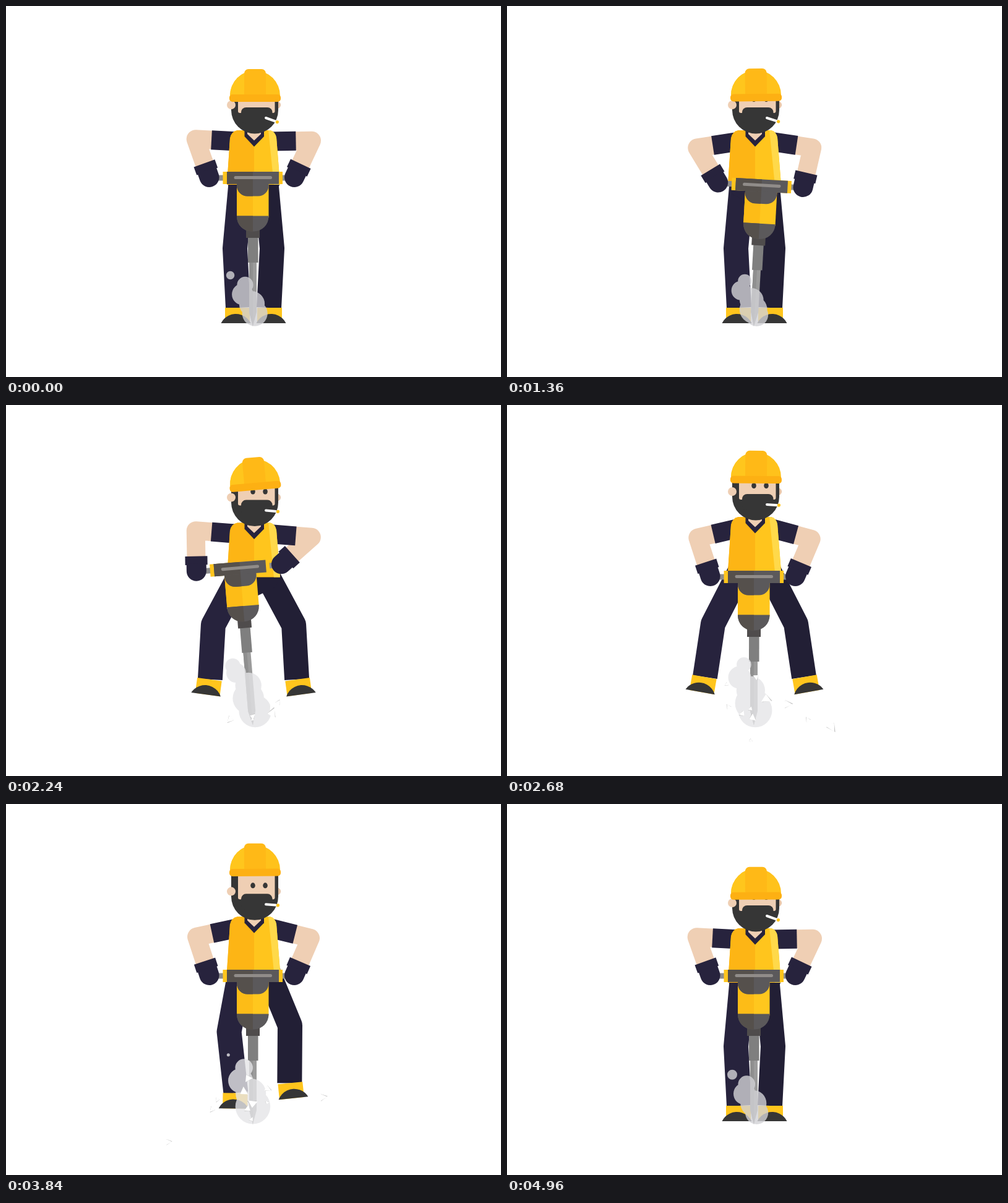
Write an HTML page with a canvas that moves like this. It is 800 px wide and 600 px high and loops after 5 s.

```html
<!DOCTYPE html>
<html lang="en">
<head>
<meta charset="utf-8">
<title>Jackhammer</title>
<style>
  html, body { margin: 0; width: 100%; height: 100%; overflow: hidden; background: #fff; }
  canvas { display: block; }
</style>
</head>
<body>
<canvas width="800" height="600"></canvas>
<script>
const ctx = document.querySelector('canvas').getContext('2d');
const LOOP = 5000, LIFTOFF = 1760, LANDING = 3930;
const NAVY = '#27233d', NAVY_DARK = '#221f35', SKIN = '#efcfb4', HAIR = '#363636';
const YELLOW = '#ffc51d', ORANGE = '#fdb515';
const TIP = { x: 399, y: 517 };

const rad = deg => deg * Math.PI / 180;
const mix = (a, b, u) => a + (b - a) * u;
const clamp = u => Math.min(1, Math.max(0, u));
const random = n => { const s = Math.sin(n * 127.1) * 43758.5; return s - Math.floor(s); };

function ease(t, from, to) {
  const u = clamp((t - from) / (to - from));
  return u * u * (3 - 2 * u);
}

// half a sine wave between two times, zero elsewhere
const pulse = (t, from, to) => Math.sin(Math.PI * clamp((t - from) / (to - from)));

// steady climb to the peak, then a free fall
function hop(t, peak) {
  if (t < peak) return clamp((t - LIFTOFF) / (peak - LIFTOFF));
  return 1 - clamp((t - peak) / (LANDING - peak)) ** 2;
}

function poseAt(t) {
  const cycle = 2 * Math.PI * t / LOOP;
  const rise = hop(t, 3600), jolt = pulse(t, 1800, 2680), bob = Math.sin(2 * cycle);
  return {
    rise,
    body: -40 * rise,
    lift: 3 * bob - 21 * hop(t, 3800),
    tilt: rad(2 * bob * (1 - rise) - 4 * jolt),
    sway: rad(3.4 * pulse(t, 0, 2200) - 4.7 * jolt
      + 4 * pulse(t, 2680, 3480) + 2 * pulse(t, 3960, 4960)),
    slide: 12 * pulse(t, 900, 1820) - 15 * jolt,
    cigarette: rad(3.5 + 16.5 * Math.cos(4 * cycle) * (1 - 2 * rise))
  };
}

function at(x, y, angle, draw) {
  ctx.save();
  ctx.translate(x, y);
  ctx.rotate(angle);
  draw();
  ctx.restore();
}

function rect(color, x, y, w, h, r = 0) {
  ctx.fillStyle = color;
  ctx.beginPath();
  ctx.roundRect(x, y, w, h, r);
  ctx.fill();
}

function oval(color, x, y, rx, ry = rx) {
  ctx.fillStyle = color;
  ctx.beginPath();
  ctx.ellipse(x, y, rx, ry, 0, 0, 7);
  ctx.fill();
}

function poly(color, ...pts) {
  ctx.fillStyle = color;
  ctx.beginPath();
  for (let i = 0; i < pts.length; i += 2) ctx.lineTo(pts[i], pts[i + 1]);
  ctx.fill();
}

function line(color, width, cap, ...pts) {
  ctx.strokeStyle = color;
  ctx.lineWidth = width;
  ctx.lineCap = cap;
  ctx.lineJoin = 'round';
  ctx.beginPath();
  for (let i = 0; i < pts.length; i += 2) ctx.lineTo(pts[i], pts[i + 1]);
  ctx.stroke();
}

function twoTone(shape, split, left, right) {
  ctx.save();
  ctx.clip(shape);
  rect(right, split - 200, -400, 400, 1200);
  rect(left, split - 200, -400, 200, 1200);
  ctx.restore();
}

function box(x, y, w, h, r = 0) {
  const p = new Path2D();
  p.roundRect(x, y, w, h, r);
  return p;
}

const VEST = new Path2D(
  'M357 289L362 214Q364 203 374 201H427Q435 203 437 213L443 289Z');
const PELVIS = new Path2D('M357.5 285H443.5L436 305L400 322L365 305Z');
const DOME = new Path2D('M-40.5 1A40.5 40.5 0 0 1 40.5 1Z');

function drawLeg(side, t, { rise, body }) {
  const fold = 3520 + (side > 0 ? 160 : 0);
  const spread = ease(t, LIFTOFF, 2360) * (1 - ease(t, fold, fold + 380));
  const kneeSpread = Math.sqrt(spread);
  const kx = 400 + side * mix(30, 67, kneeSpread), ky = mix(392 + body, 354, kneeSpread);
  const fx = 400 + side * mix(25, 70 + 20 * rise, spread), fy = mix(488 + body, 440, spread);

  line(side < 0 ? NAVY : NAVY_DARK, 40, 'butt', 400 + side * 20, 282 + body, kx, ky, fx, fy);
  at(fx, fy, rad(-side * spread * (7 + 6 * rise)), () => {
    ctx.scale(side, 1);
    rect(YELLOW, -19, 0, 40, 25);
    ctx.fillStyle = HAIR;
    ctx.beginPath();
    ctx.arc(3.5, 36.7, 26.7, Math.PI + 0.453, -0.453);
    ctx.fill();
  });
}

// two-bone arm from the shoulder to the hammer grip
function makeArm(side, { body, sway, slide }) {
  const upper = 68.5, lower = 65.5;
  const sx = side < 0 ? 375 : 425.5, sy = 219 + body;
  const lx = side < 0 ? -70.5 : 67, ly = slide - 240;
  const hx = TIP.x + lx * Math.cos(sway) - ly * Math.sin(sway);
  const hy = TIP.y + lx * Math.sin(sway) + ly * Math.cos(sway);
  const d = Math.hypot(hx - sx, hy - sy);
  const bend = Math.acos((upper * upper + d * d - lower * lower) / (2 * upper * d));
  const a = Math.atan2(hy - sy, hx - sx) - side * bend;
  const ex = sx + upper * Math.cos(a), ey = sy + upper * Math.sin(a);
  return { sx, sy, ex, ey, hx, hy, a };
}

function drawArm({ sx, sy, ex, ey, hx, hy, a }) {
  line(SKIN, 30, 'butt', sx, sy, ex, ey, hx, hy);
  line(NAVY, 31, 'butt', sx, sy, sx + 43 * Math.cos(a), sy + 43 * Math.sin(a));
}

function drawGlove({ ex, ey, hx, hy }) {
  at(hx, hy, Math.atan2(hy - ey, hx - ex) - Math.PI / 2, () => {
    rect(NAVY, -18, -24, 36, 14);
    rect(NAVY, -16, -12, 32, 28, [0, 0, 16, 16]);
  });
}

function drawTorso() {
  twoTone(VEST, 401, ORANGE, YELLOW);
  ctx.save();
  ctx.clip(VEST);
  poly('#ffd94a', 424, 200, 440, 200, 446, 290, 433, 290);
  ctx.restore();
  poly(NAVY, 385.5, 200, 417, 200, 417, 211, 401, 227.5, 385.5, 211);
  poly(SKIN, 390, 200, 412, 200, 412, 207, 401, 217.5, 390, 207);
}

function drawHead(cigarette) {
  oval('#e6c3a6', 438, 160, 6);
  rect(HAIR, 364, 132, 76, 74.5, [0, 0, 38, 38]);
  rect(SKIN, 375, 132, 59.5, 41, [0, 0, 3, 3]);
  rect(HAIR, 380, 164, 50.5, 26, 8);
  oval(SKIN, 364, 160, 7);
  oval(HAIR, 399, 150.5, 3.8, 4.5);
  oval(HAIR, 419, 150.5, 3.8, 4.5);
  at(420, 181, cigarette, () => {
    line('#fff', 4, 'round', 0, 0, 16, 0);
    oval(YELLOW, 19.5, 0, 2.6);
  });
}

function drawHelmet() {
  twoTone(DOME, 0, '#ffc61d', '#ffc21b');
  rect('#ffb917', -17.5, -42, 35, 43, [7, 7, 0, 0]);
  rect('#fdb013', -41.5, -1, 83, 12, 5);
}

function drawHammer(slide) {
  const tip = 239 - slide;
  const dark = shape => twoTone(shape, 0, '#55504c', '#5b595b');
  poly('#9b9b9b', -6, 130, 6, 130, 6, tip - 22, 0, tip + 1, -6, tip - 22);
  poly('#8f8f8f', -6, 130, 0, 130, 0, tip + 1, -6, tip - 22);
  rect('#7f7f7f', -8, 95, 16.5, 42);
  rect('#4f4c4c', -11, 82, 22, 15);
  rect('#8d8d8d', -57, -4.5, 110, 9);
  rect(YELLOW, -48.5, -10, 96.5, 20);
  twoTone(box(-26, 8, 51.5, 56), 0, '#fdbc17', '#ffc71e');
  dark(box(-26, 61.5, 51.5, 25, [0, 0, 24, 24]));
  dark(box(-26, 8, 51.5, 21.5, [0, 0, 17, 17]));
  dark(box(-42, -10, 84, 20));
  rect('#908c89', -30.5, -3, 61.5, 5, 2.5);
}

function drawDust(t, air) {
  const cloud = new Path2D();
  for (let i = 0; i < 5; i++) {
    const u = (0.04 + i * 0.22 + t / 1250) % 1;
    const x = 404 + (20 * (i % 2) - 45) * u, y = 500 - (70 + 25 * air) * u;
    const r = 24 * Math.sqrt(1 - u) * Math.min(1, 0.75 + u * 3) * (1 + 0.25 * air);
    cloud.moveTo(x + r, y);
    cloud.arc(x, y, r, 0, 2 * Math.PI);
  }
  const tone = 211 + 18 * air;
  ctx.fillStyle = `rgba(${tone},${tone},${tone + 3},.8)`;
  ctx.fill(cloud);
}

function drawShards(t) {
  for (let i = 0; i < 38; i++) {
    const age = (t - 1900 - i * 62) / 1000;
    if (age < 0 || age > 0.7) continue;
    const x = TIP.x + (random(i + 1) - 0.5) * 500 * age;
    const y = 512 - (50 + 230 * random(i + 50)) * age + 225 * age * age;
    const s = 2.5 + 6 * random(i + 90);
    at(x, y, random(i + 130) * 6 + age * 5, () => {
      poly('#c2c2c2', -s, s, s, s * 0.7, 0, -s);
      poly('#fff', -s, s * 0.8, s, s * 0.7, s * 0.2, -s * 1.1);
    });
  }
}

function draw(t) {
  const pose = poseAt(t);
  const { body, lift, tilt, sway, slide, cigarette } = pose;
  const arms = [-1, 1].map(side => makeArm(side, pose));

  rect('#fff', 0, 0, 800, 600);
  drawLeg(1, t, pose);
  drawLeg(-1, t, pose);
  at(0, body, 0, () => twoTone(PELVIS, 400, NAVY, NAVY_DARK));
  arms.forEach(drawArm);
  at(0, body, 0, () => {
    drawTorso();
    drawHead(cigarette);
  });
  at(402.5, 144 + body + lift, tilt, drawHelmet);
  at(TIP.x, TIP.y, sway, () => {
    ctx.translate(0, slide - 239);
    drawHammer(slide);
  });
  arms.forEach(drawGlove);
  drawDust(t, clamp(-body / 11));
  drawShards(t);
}

const start = performance.now();
function tick() {
  draw((performance.now() - start) % LOOP);
  requestAnimationFrame(tick);
}
tick();
</script>
</body>
</html>
```
